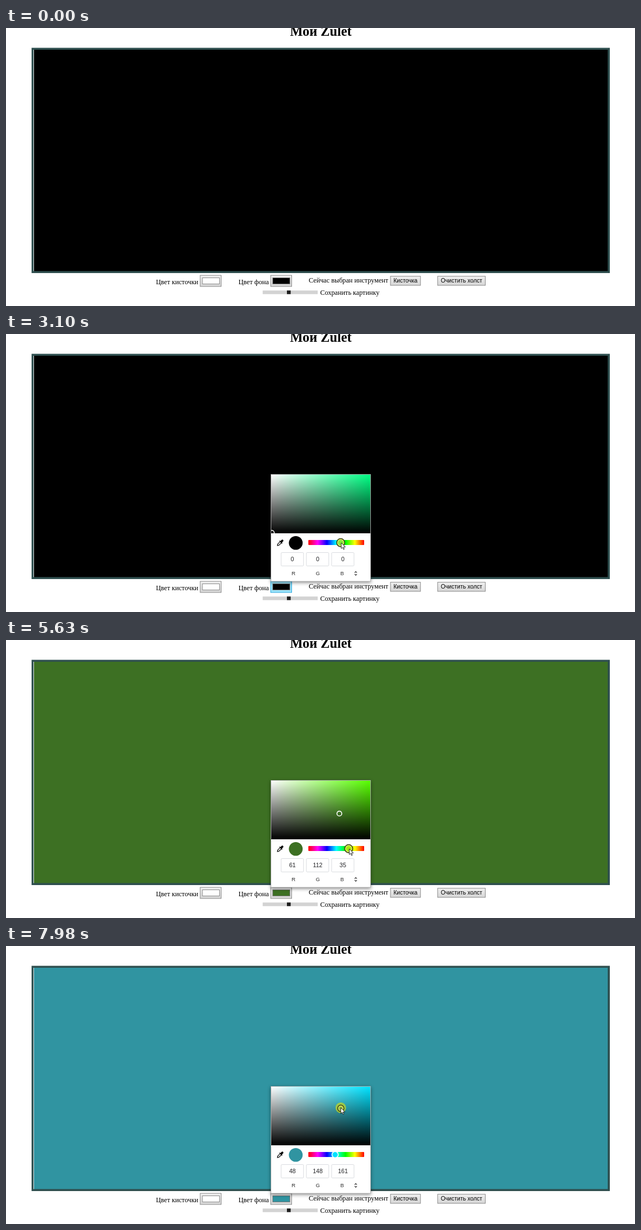
Animation of 1124x498 px, one loop 8000 ms. Source, as an HTML page:

```html
<!DOCTYPE html>
<html lang="ru">
<head>
<meta charset="utf-8">
<style>
html, body { margin: 0; width: 100%; height: 100%; overflow: hidden; background: #fff }
svg { display: block; font: 12.2px "Liberation Serif", "Times New Roman", serif }
.sans { font-family: "Liberation Sans", Arial, sans-serif; text-anchor: middle }
.title { font-size: 24.3px; font-weight: bold; text-anchor: middle }
.button { font-size: 10.3px }
.value { font-size: 10.6px; fill: #202124 }
.unit { font-size: 9.6px; fill: #333 }
.box { fill: url(#face); stroke: #8a8a8a }
.field { fill: #fff; stroke: #dadce0 }
#picker { filter: drop-shadow(0 2px 3px #0007) }
#swatch.active { fill: #9be4fa; stroke: #2aa5dc }
</style>
</head>
<body>
<svg width="1124" height="498" viewBox="0 0 1124 498">
  <defs>
    <linearGradient id="face" x2="0" y2="1"><stop stop-color="#efefef"/><stop offset="1" stop-color="#d6d6d6"/></linearGradient>
    <linearGradient id="white"><stop stop-color="#fff"/><stop offset="1" stop-color="#fff" stop-opacity="0"/></linearGradient>
    <linearGradient id="black" x2="0" y2="1"><stop stop-opacity="0"/><stop offset="1"/></linearGradient>
    <linearGradient id="rainbow">
      <stop stop-color="#f00"/><stop offset=".1667" stop-color="#f0f"/><stop offset=".3333" stop-color="#00f"/>
      <stop offset=".5" stop-color="#0ff"/><stop offset=".6667" stop-color="#0f0"/>
      <stop offset=".8333" stop-color="#ff0"/><stop offset="1" stop-color="#f00"/>
    </linearGradient>
    <clipPath id="area"><rect x="474" y="252" width="177" height="105"/></clipPath>
  </defs>

  <text class="title" x="562.5" y="13.5">Мой Zulet</text>
  <path fill="#2f4f4f" d="M45.7 35.4H1079V439H45.7Z"/>
  <path fill="#dfe6e6" d="M49 39H50V435.5H49Z"/>
  <rect id="paper" x="50" y="39" width="1025.3" height="396.4"/>

  <text x="268" y="458.5">Цвет кисточки</text>
  <rect class="box" x="347" y="443" width="37.5" height="20"/>
  <rect x="351" y="447.5" width="30.5" height="11" fill="#fff" stroke="#8a8a8a"/>
  <text x="415.5" y="458.5">Цвет фона</text>
  <rect id="swatch" class="box" x="473" y="443" width="37.5" height="20"/>
  <rect id="chosen" x="476.7" y="447.5" width="30.5" height="11" stroke="#777"/>
  <text x="541" y="456.3">Сейчас выбран инструмент</text>
  <rect class="box" x="687" y="444.7" width="53.7" height="16.3"/>
  <text class="sans button" x="713.8" y="456.4">Кисточка</text>
  <rect class="box" x="771.3" y="444.7" width="85.2" height="16.3"/>
  <text class="sans button" x="814" y="456.4">Очистить холст</text>
  <path fill="#d3d3d3" d="M458.7 470.2H557V476.7H458.7Z"/>
  <path fill="#1d1d1d" d="M502 470.2H508.7V476.7H502Z"/>
  <text x="561.5" y="478.3">Сохранить картинку</text>

  <g id="picker">
    <rect x="473.5" y="251.5" width="178" height="191.5" fill="#fff" stroke="#aaa" stroke-width=".8"/>
    <g clip-path="url(#area)">
      <rect id="tone" x="474" y="252" width="177" height="105"/>
      <rect x="474" y="252" width="177" height="105" fill="url(#white)"/>
      <rect x="474" y="252" width="177" height="105" fill="url(#black)"/>
      <circle id="spot" r="4.3" fill="none" stroke="#fff" stroke-width="1.6"/>
    </g>
    <g transform="translate(490 374) rotate(45)">
      <path d="M-1.9 -2.4V-6Q0 -8.6 1.9 -6V-2.4H3.4V-.8H-3.4V-2.4Z"/>
      <path d="M-1.5 -.8V4.8L0 7 1.5 4.8V-.8" fill="none" stroke="#000" stroke-width="1.2"/>
    </g>
    <circle id="preview" cx="517.8" cy="374.3" r="12.3"/>
    <rect x="540.3" y="369" width="99.7" height="9" rx="1" fill="url(#rainbow)"/>
    <circle id="knob" cy="373.8" r="5.6" stroke="#fff" stroke-width="1.6"/>
    <g class="sans">
      <rect class="field" x="491.7" y="391.5" width="40" height="24" rx="1.5"/>
      <rect class="field" x="536.8" y="391.5" width="40" height="24" rx="1.5"/>
      <rect class="field" x="581.9" y="391.5" width="40" height="24" rx="1.5"/>
      <text class="value" x="511.8" y="407.4"></text>
      <text class="value" x="557" y="407.4"></text>
      <text class="value" x="602" y="407.4"></text>
      <text class="unit" x="513.7" y="432.4">R</text>
      <text class="unit" x="557.2" y="432.4">G</text>
      <text class="unit" x="600.8" y="432.4">B</text>
    </g>
    <path d="M623 427.6L625 425.6 627 427.6M623 430.2L625 432.2 627 430.2" fill="none" stroke="#222" stroke-width="1.1"/>
  </g>

  <g id="press">
    <circle id="glow" fill="#d2dc14" fill-opacity=".65"/>
    <circle id="ring" fill="none" stroke="#3a4212" stroke-width="1.5"/>
  </g>
  <path id="pointer" d="M0 0V10.4L2.4 8.2 4 12 5.6 11.3 4 7.6H7.4Z" fill="#fff" stroke="#000" stroke-width=".8"/>
</svg>

<script>
const $ = id => document.getElementById(id);
const values = document.querySelectorAll('.value');
const set = (id, attrs) => { for (const k in attrs) $(id).setAttribute(k, attrs[k]); };
const show = (id, on) => set(id, { visibility: on ? 'visible' : 'hidden' });
const mix = (a, b, k) => a + (b - a) * k;

// Each key is [time, value...]; values ease from one key to the next.
function track(keys, t) {
  const i = keys.findIndex(k => k[0] > t);
  if (i === 0) return keys[0].slice(1);
  if (i < 0) return keys[keys.length - 1].slice(1);
  const a = keys[i - 1], b = keys[i], p = (t - a[0]) / (b[0] - a[0]);
  const k = p * p * (3 - 2 * p);
  return a.slice(1).map((v, j) => mix(v, b[j + 1], k));
}

const OPEN = 1340, PICK = 4160, LOOP = 8000;
const hueKeys = [[2320, 360], [2910, 168], [3100, 151], [3130, 151], [3310, 104], [3510, 95.82],
  [5600, 95.82], [5760, 133], [6150, 144], [6590, 138.7], [6630, 138.7], [6950, 186.8]];
const shadeKeys = [[PICK, .836, .286], [4500, .87, .42], [4900, .84, .56], [5270, .8171, .6431],
  [5300, .8171, .6431], [5460, .6875, .4392], [7150, .6875, .4392], [7330, .6378, .498],
  [7360, .6378, .498], [7980, .7019, .6314]];
const approach = [[130, 744, 496], [800, 493, 447], [1400, 493, 447], [2130, 541, 373]];
// 0 keeps the pointer on the hue bar, 1 on the shade area.
const placeKeys = [[3750, 0], [3930, 1], [5460, 1], [5600, 0], [6950, 0], [7150, 1]];
const presses = [[2320, 3530], [PICK, 5460], [5600, 6960], [7150, LOOP]];

function rgb(h, s, v) {
  return [5, 3, 1].map(n => {
    const k = (n + h / 60) % 6;
    return Math.round(255 * v * (1 - s * Math.max(0, Math.min(k, 4 - k, 1))));
  });
}
const css = c => `rgb(${c})`;
const colourAt = t => t < PICK ? [0, 0, 0] : rgb(track(hueKeys, t)[0], ...track(shadeKeys, t));

function draw(t) {
  const [hue] = track(hueKeys, t), [s, v] = track(shadeKeys, t);
  const hueX = 640 - hue / 3.6, shadeX = 474 + 177 * s, shadeY = 357 - 105 * v;
  const colour = colourAt(t), pure = css(rgb(hue, 1, 1));
  // The page keeps its colour while the hue is being fine-tuned.
  const page = css(colourAt(t > 5760 && t < 6590 ? 5760 : t));

  set('paper', { fill: page });
  set('chosen', { fill: page });
  $('swatch').classList.toggle('active', t >= 780 && t < PICK);
  show('picker', t >= OPEN);
  set('tone', { fill: pure });
  set('knob', { cx: hueX, fill: pure });
  set('spot', t < PICK ? { cx: 475, cy: 356 } : { cx: shadeX, cy: shadeY });
  set('preview', { fill: css(colour) });
  values.forEach((el, i) => el.textContent = colour[i]);

  const [k] = track(placeKeys, t);
  const [x, y] = t < 2320 ? track(approach, t) : [mix(hueX + 1, shadeX, k), mix(374, shadeY - 1, k)];
  show('pointer', t >= 130);
  set('pointer', { transform: `translate(${x} ${y})` });

  const onHue = k < .5;
  show('press', presses.some(([a, b]) => t >= a && t < b));
  set('glow', { cx: onHue ? hueX : x, cy: onHue ? 373.8 : y, r: onHue ? 7 : 9.5 });
  set('ring', { cx: onHue ? hueX : shadeX, cy: onHue ? 373.8 : shadeY, r: onHue ? 7.2 : 5.6 });
}

const start = performance.now();
function frame() {
  draw((performance.now() - start) % LOOP);
  requestAnimationFrame(frame);
}
frame();
</script>
</body>
</html>
```
